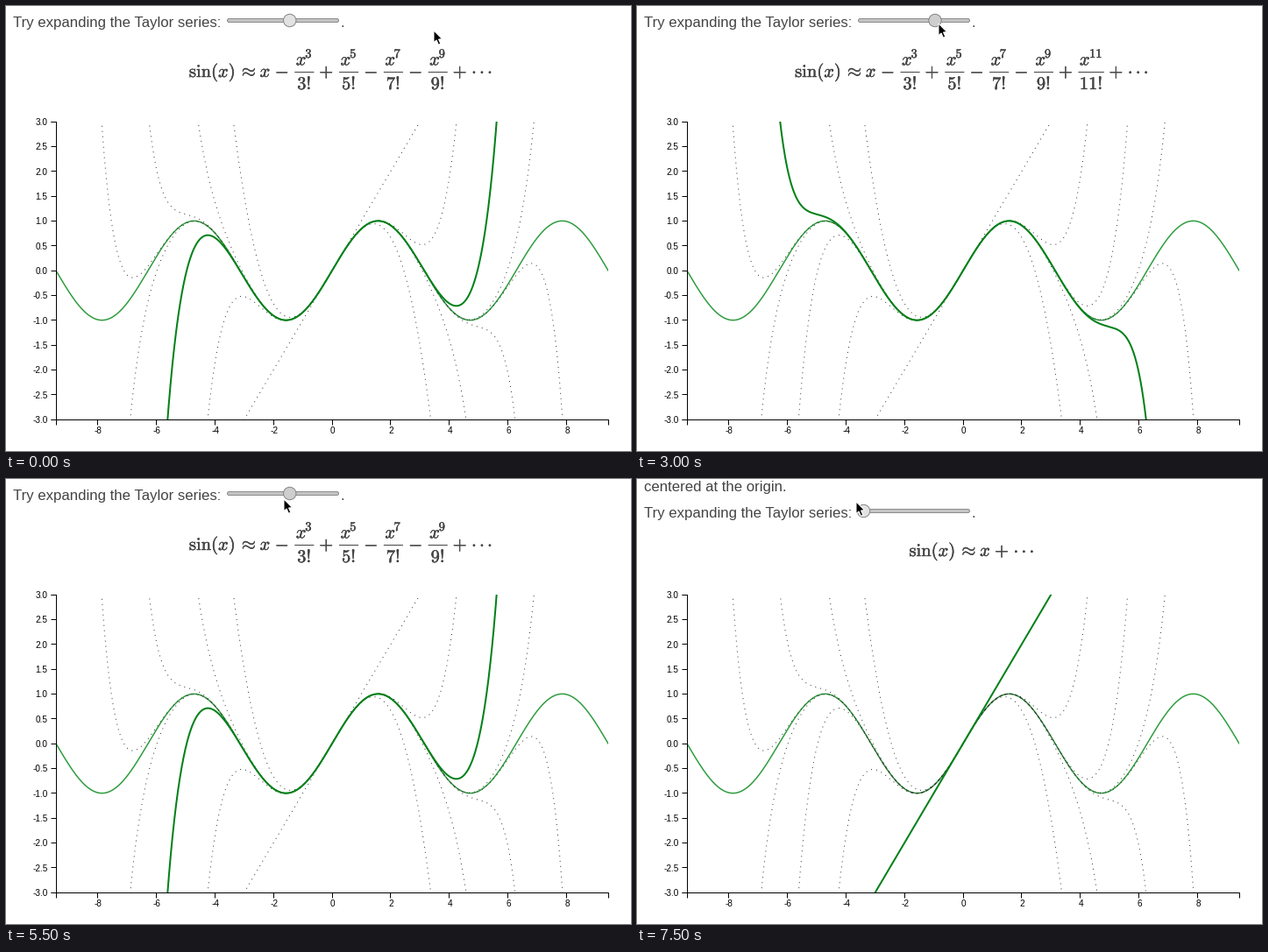
Animation of 713x508 px, one loop 8 s. Source, as a matplotlib script:

```python
import math

import matplotlib.pyplot as plt
import numpy as np
from matplotlib.animation import FuncAnimation
from matplotlib.patches import Circle, FancyBboxPatch, Polygon
from matplotlib.patheffects import Normal, Stroke

W, H, DPI = 713, 508, 64
STEP = 250
FRAMES = 32
PT = 72 / DPI  # points per pixel

INK = "#444444"
SANS = "Liberation Sans"
plt.rcParams["mathtext.fontset"] = "cm"
plt.rcParams["path.snap"] = False
HEAVY = [Stroke(linewidth=0.45 * PT, foreground=INK), Normal()]

# plot box in pixels
LEFT, RIGHT, TOP, BOTTOM = 57, 687, 132, 472
X_MAX, Y_MAX = 3 * math.pi, 3

# slider
KNOB_X, KNOB_Y, KNOB_GAP = 258.5, 16.5, 16.3
GRAB = 8  # step at which the knob is pressed
RELEASE = 30

# pointer path: step, x, y
POINTER = np.array([
    (0, 488, 28), (2, 430, 86), (4, 233, 50), (5, 274, 14),
    (8, 318, 21), (9, 318, 21), (10, 326, 21), (12, 344, 20),
    (14, 357, 22), (15, 368, 22), (16, 368, 22), (17, 361, 23),
    (18, 353, 23), (20, 341, 22), (21, 332, 23), (22, 317, 23),
    (25, 288, 23), (26, 283, 23), (27, 270, 23), (28, 270, 23),
    (29, 255, 24), (30, 250, 26), (31, 250, 26),
])
ARROW = np.array([
    (0, 0), (0, 13.6), (3.1, 10.9), (5.4, 16.2),
    (7.8, 15.2), (5.5, 10), (9.6, 9.7),
])

fig = plt.figure(figsize=(W / DPI, H / DPI), dpi=DPI, facecolor="white")


def pixel_axes(zorder):
    ax = fig.add_axes([0, 0, 1, 1], zorder=zorder)
    ax.set(xlim=(0, W), ylim=(H, 0))
    ax.axis("off")
    return ax


stage = pixel_axes(2)
graph = fig.add_axes(
    [LEFT / W, 1 - BOTTOM / H, (RIGHT - LEFT) / W, (BOTTOM - TOP) / H], zorder=1)
graph.set(xlim=(-X_MAX, X_MAX), ylim=(-Y_MAX, Y_MAX))
graph.axis("off")


def label(x, y, text, size, color=INK, ha="left", va="baseline"):
    return stage.text(x, y, text, fontsize=size * PT, color=color,
                      family=SANS, ha=ha, va=va)


def line(xs, ys, color="black", width=1):
    return stage.plot(xs, ys, color=color, lw=width * PT,
                      solid_capstyle="butt", solid_joinstyle="miter")[0]


def crisp(v):
    """Centre of the pixel that holds v."""
    return math.floor(v) + 0.5


def draw_axes():
    left, right, top, bottom = map(crisp, (LEFT, RIGHT, TOP, BOTTOM))
    line([left - 6, left, left, left - 6], [top, top, bottom, bottom])
    line([left, left, right, right],
         [bottom + 6, bottom, bottom, bottom + 6])
    mid_x, mid_y = (LEFT + RIGHT) / 2, (TOP + BOTTOM) / 2
    for v in range(-8, 9, 2):
        x = mid_x + v * (RIGHT - LEFT) / (2 * X_MAX)
        line([crisp(x)] * 2, [bottom, bottom + 6])
        label(x + 0.5, 487.5, str(v), 10, "black", "center")
    for v in np.arange(-3, 3.5, 0.5):
        y = mid_y - v * (BOTTOM - TOP) / (2 * Y_MAX)
        line([left - 6, left], [crisp(y)] * 2)
        label(47.7, y + 4, f"{v:.1f}", 10, "black", "right")


def draw_curves():
    x = np.linspace(-X_MAX, X_MAX, 1200)
    graph.plot(x, np.sin(x), color="#2c9c3c", lw=1.5 * PT, zorder=1)
    dotted, bold = [], []
    total = np.zeros_like(x)
    for k in range(8):
        n = 2 * k + 1
        total = total + (-1) ** k * x ** n / math.factorial(n)
        dotted += graph.plot(x, total, color="#333333", lw=PT, zorder=2,
                             dashes=(1, 5), dash_capstyle="butt")
        bold += graph.plot(x, total, color="#008018", lw=2 * PT, zorder=3)
    return dotted, bold


def math_text(x, y, tex, size=20.5, ha="center"):
    return stage.text(x, y, f"${tex}$", fontsize=size * PT, color=INK,
                      ha=ha, va="baseline", path_effects=HEAVY)


def fraction(x, n):
    width = 11.8 + 7.3 * len(str(n))
    half = width / 2
    return [
        math_text(x - half, 67.5, "x", ha="left"),
        math_text(x + half, 59, str(n), 14.5, "right"),
        line([x - half - 1.5, x + half + 1.5], [75.5, 75.5], INK),
        math_text(x, 95, f"{n}!"),
    ]


def equation(k):
    """Series with k fractions, centred over the graph."""
    powers = [2 * i + 3 for i in range(k)]
    pitches = [50.8 if n < 10 else 57.5 for n in powers]
    start = 382 - (143 + sum(pitches)) / 2
    base = 81 if k else 88
    parts = [
        math_text(start, base, r"\sin(x)", ha="left"),
        math_text(start + 66.5, base, r"\approx"),
        math_text(start + 87, base, "x"),
    ]
    x = start + 106
    for n, pitch in zip(powers, pitches):
        sign = "+" if n in (5, 11) else "-"
        parts.append(math_text(x, base, sign))
        parts += fraction(x + pitch / 2, n)
        x += pitch
    parts.append(math_text(x, base, "+"))
    parts += [math_text(x + dx, base, r"\cdot") for dx in (16, 25, 34)]
    return parts


def track(y, height, color, edge):
    box = FancyBboxPatch((252.5, y), 127, height, fc=color, ec=edge, lw=PT,
                         boxstyle="round,pad=0,rounding_size=2")
    return stage.add_patch(box)


draw_axes()
dotted, bold = draw_curves()
equations = [equation(k) for k in range(8)]

heading = [
    (label(7.5, 0, "centered at the origin.", 16.8), -6),
    (label(7.5, 0, "Try expanding the Taylor series:", 16.8), 24),
    (label(381.5, 0, ".", 16.8), 24),
]
heading[0][0].set_clip_on(True)
rail = track(14.5, 4, "#c4c4c4", "#8c8c8c")
knob = stage.add_patch(Circle((0, 0), 7.2, ec="#858585", lw=PT, zorder=4))
arrow = stage.add_patch(Polygon(ARROW, fc="black", ec="white", lw=PT,
                                joinstyle="miter", zorder=6))


def pointer_at(i):
    return [np.interp(i, POINTER[:, 0], POINTER[:, c]) for c in (1, 2)]


def update(i):
    px, py = pointer_at(i)
    k = 4
    if i >= GRAB:
        k = min(7, max(0, round((px + 2 - KNOB_X) / KNOB_GAP)))
    shift = 0 if k else 20  # the short formula lets the page slide down

    for j in range(8):
        dotted[j].set_visible(j != k)
        bold[j].set_visible(j == k)
        for part in equations[j]:
            part.set_visible(j == k)
    for text, y in heading:
        text.set_y(y + shift)
    rail.set_y(14.5 + shift)
    knob.center = (KNOB_X + KNOB_GAP * k, KNOB_Y + shift)
    knob.set_facecolor("#cecece" if GRAB <= i < RELEASE else "#e2e2e2")
    arrow.set_xy(ARROW + (px, py))
    return []


anim = FuncAnimation(fig, update, frames=FRAMES, interval=STEP,
                     init_func=lambda: update(0), repeat=True, repeat_delay=0)
plt.show()
```
